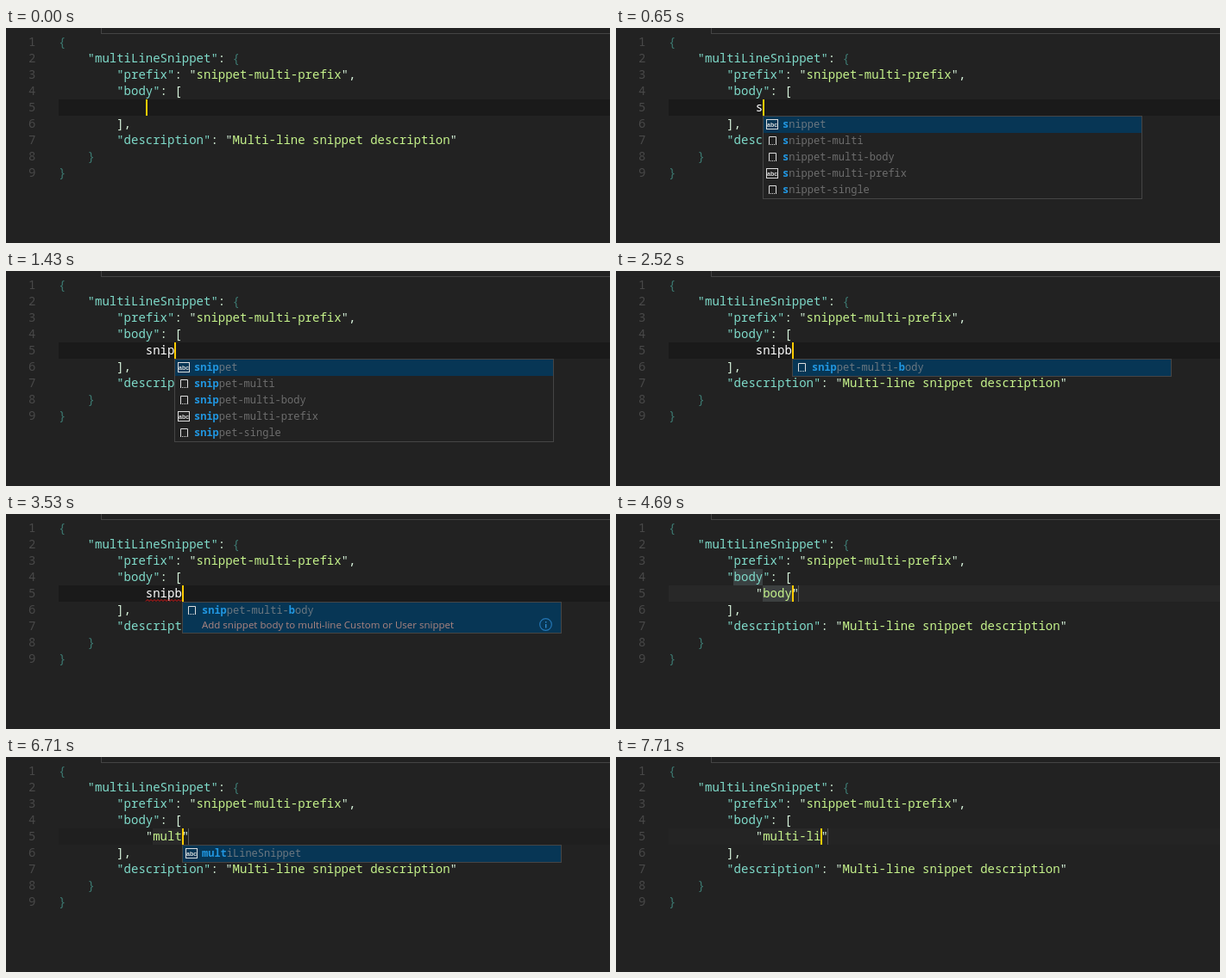
Animation, 700 px wide and 250 px high, one loop 8 s. Source, as an HTML page with a canvas:

```html
<!DOCTYPE html>
<html lang="en">
<head>
<meta charset="utf-8">
<title>Snippet completion</title>
<style>
  html, body { margin: 0; width: 100%; height: 100%; overflow: hidden; background: #222; }
  canvas { display: block; }
</style>
</head>
<body>
<canvas id="stage" width="700" height="250"></canvas>
<script>
const ctx = document.getElementById('stage').getContext('2d');
const LOOP = 8000, LEFT = 61, TOP = 7, ROW = 19, CHAR = 8.4;
const MONO = '"Noto Sans Mono", "DejaVu Sans Mono", monospace';
const KEY = '#7fdbca', STRING = '#c5f28b', PUNCT = '#d9f5dd', BRACE = '#3d7a72';

const key = (col, name) => [[col, `"${name}"`, KEY], [col + name.length + 2, ':', PUNCT]];
const string = (col, text) => [[col, '"', PUNCT], [col + 1, text, STRING], [col + 1 + text.length, '"', PUNCT]];

// Each line is a list of [column, text, colour].
const lines = [
  [[0, '{', BRACE]],
  [...key(4, 'multiLineSnippet'), [24, '{', BRACE]],
  [...key(8, 'prefix'), ...string(18, 'snippet-multi-prefix'), [40, ',', PUNCT]],
  [...key(8, 'body'), [16, '[', PUNCT]],
  [],
  [[8, '],', PUNCT]],
  [...key(8, 'description'), ...string(23, 'Multi-line snippet description')],
  [[4, '}', BRACE]],
  [[0, '}', BRACE]],
];

const typing = [
  [0, ''], [650, 's'], [1040, 'sn'], [1190, 'sni'], [1430, 'snip'], [2520, 'snipb'],
  [4690, 'body'], [6100, 'm'], [6330, 'mu'], [6480, 'mul'], [6640, 'mult'], [6790, 'multi'],
  [7100, 'multi-'], [7480, 'multi-l'], [7710, 'multi-li'],
];
const caretOff = [[420, 650], [1910, 2370], [2980, 3530], [4000, 4460], [5160, 5700]];
const squiggles = [[810, 1040], [1740, 2520], [2830, 4690]];

const snippets = ['snippet', 'snippet-multi', 'snippet-multi-body', 'snippet-multi-prefix', 'snippet-single'];
const wordItems = ['snippet', 'snippet-multi-prefix', 'multiLineSnippet'];

const within = (t, spans) => spans.some(([from, to]) => t >= from && t < to);
const colX = col => LEFT + col * CHAR;
const lineY = i => TOP + i * ROW;

function rect(x, y, w, h, color) {
  ctx.fillStyle = color;
  ctx.fillRect(x, y, w, h);
}

function mono(text, x, y, color, size = 14, weight = 400) {
  ctx.font = `${weight} ${size}px ${MONO}`;
  ctx.fillStyle = color;
  [...text].forEach((c, i) => ctx.fillText(c, x + i * size * 0.6, y));
}

function drawTokens(tokens, row) {
  for (const [col, text, color] of tokens) mono(text, colX(col), lineY(row) + 14, color);
}

function drawIcon(isWord, x, y) {
  ctx.strokeStyle = '#ddd';
  ctx.lineWidth = 1;
  if (isWord) {
    ctx.strokeRect(x + 4.5, y + 4.5, 13, 11);
    ctx.font = 'bold 7px "Liberation Sans", sans-serif';
    ctx.fillStyle = '#ddd';
    ctx.fillText('abc', x + 5, y + 13);
    return;
  }
  ctx.beginPath();
  ctx.moveTo(x + 7.5, y + 14);
  ctx.lineTo(x + 7.5, y + 5.5);
  ctx.lineTo(x + 15.5, y + 5.5);
  ctx.lineTo(x + 15.5, y + 14);
  ctx.stroke();
  for (let i = 0; i < 5; i++) rect(x + 7 + i * 2, y + 14, 1, 1, '#ddd');
}

function drawDetail(x) {
  ctx.font = '11.5px "Open Sans", sans-serif';
  ctx.fillStyle = '#ad8580';
  ctx.fillText('Add snippet body to multi-line Custom or User snippet', x + 23, 133);
  ctx.strokeStyle = '#2476b5';
  ctx.lineWidth = 1.2;
  ctx.beginPath();
  ctx.arc(x + 421.5, 128.5, 6.8, 0, Math.PI * 2);
  ctx.stroke();
  rect(x + 421, 125, 1.4, 1.5, '#2e8bd0');
  rect(x + 421, 128, 1.4, 4.5, '#2e8bd0');
}

function drawPopup(typed, x, items, detail) {
  const height = detail ? 37 : items.length * ROW + 2;
  rect(x, 102, 440, height, '#454545');
  rect(x + 1, 103, 438, height - 2, '#222');
  rect(x + 1, 103, 438, detail ? height - 2 : ROW, '#073655');
  items.forEach((item, i) => {
    const y = 102 + i * ROW;
    drawIcon(wordItems.includes(item), x, y);
    let matched = 0;
    [...item].forEach((c, j) => {
      const hit = c === typed[matched];
      if (hit) matched++;
      mono(c, x + 23 + j * 7.2, y + 14, hit ? '#2196e0' : i ? '#6d6d6d' : '#6b7780', 12, hit ? 700 : 500);
    });
  });
  if (detail) drawDetail(x);
}

function drawSquiggle(from, to) {
  ctx.strokeStyle = '#e01818';
  ctx.lineWidth = 1;
  ctx.beginPath();
  for (let x = from; x <= to; x += 2) ctx.lineTo(x, (x - from) % 4 ? 99.5 : 101.5);
  ctx.stroke();
}

function draw(t) {
  const typed = typing.findLast(([start]) => t >= start)[1];
  const quoted = t >= 4690;
  const selected = quoted && t < 6100;
  const start = quoted ? 13 : 12;
  const end = start + typed.length;
  const caretX = Math.round(colX(end));

  rect(0, 0, 700, 250, '#222');
  rect(110, 0, 1, 7, '#444');
  rect(110, 6, 590, 1, '#444');
  rect(61, lineY(4), 639, ROW, !quoted ? '#1a1a1a' : selected ? '#282828' : t < 7100 ? '#1f1f1f' : '#242424');

  if (selected) rect(136, lineY(3), 34, ROW, '#3a4142');
  if (quoted) {
    rect(170, lineY(4), caretX - 170, ROW, selected ? '#3c4040' : '#292929');
    rect(Math.round(colX(end + 1)) - 1, lineY(4), 1, ROW, '#585858');
  }

  lines.forEach((tokens, i) => {
    mono(String(i + 1), 26, lineY(i) + 14, '#484848');
    drawTokens(tokens, i);
  });
  drawTokens(quoted ? string(12, typed) : [[12, typed, '#fff']], 4);

  if (within(t, squiggles)) drawSquiggle(162, caretX);
  if (!within(t, caretOff)) rect(caretX, lineY(4), 2, ROW, '#fc0');

  if (t >= 650 && t < 2520) drawPopup(typed, caretX, snippets);
  else if (t >= 2520 && t < 4690) drawPopup(typed, caretX, ['snippet-multi-body'], t >= 2600);
  else if (t >= 6100 && t < 7100) drawPopup(typed, caretX, ['multiLineSnippet']);
}

function tick() {
  draw(performance.now() % LOOP);
  requestAnimationFrame(tick);
}
tick();
</script>
</body>
</html>
```
